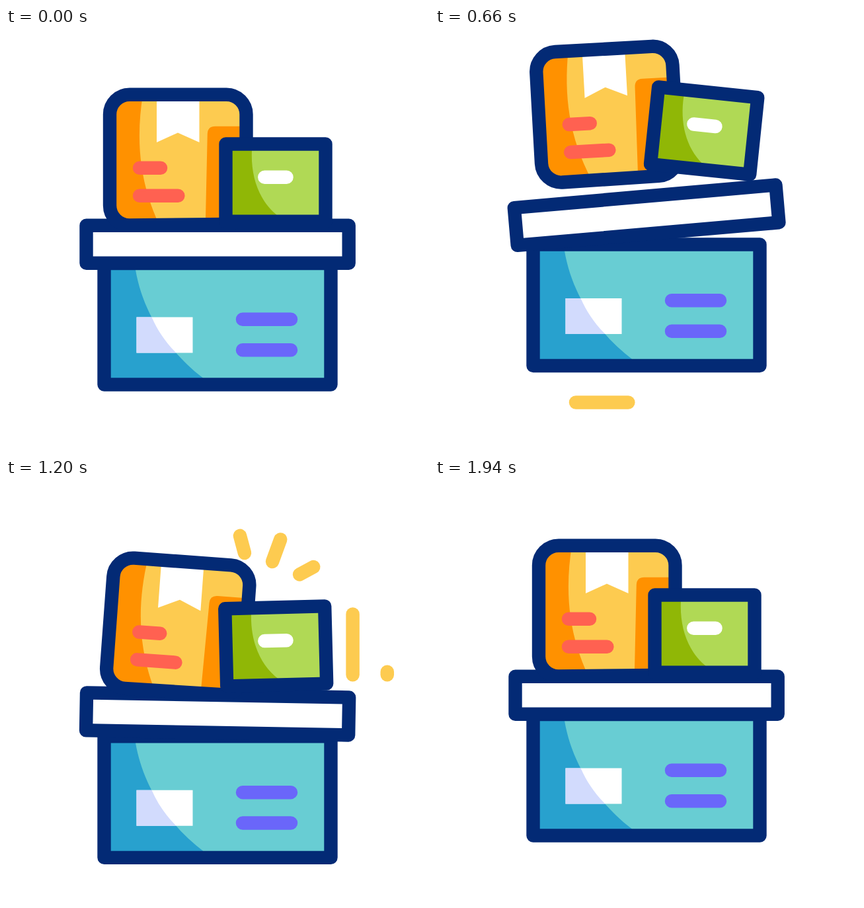
An HTML page without scripts that plays this animation: 640 px wide and 640 px high, repeating every 2660 ms.

```html
<!DOCTYPE html>
<html lang="en">
<head>
<meta charset="utf-8">
<title>Bouncing boxes</title>
<style>
  html, body { margin: 0; width: 100%; height: 100%; overflow: hidden; background: #fff; }
  svg { display: block; width: 100vw; height: 100vh; }
  g, .dash {
    animation: 2660ms cubic-bezier(.333, 0, .667, 1) infinite;
  }
  .edge { fill: none; stroke: #032a75; stroke-width: 20.4; stroke-linejoin: round; }
  .pill { stroke-width: 20.5; stroke-linecap: round; }
  .dash {
    fill: none; stroke: #fdcb50; stroke-width: 20.5; stroke-linecap: round;
    stroke-dasharray: 100 200; stroke-dashoffset: 101;
  }

  /* stack */
  #base { animation-name: base-y; }
  #lid { animation-name: lid-y, lid-r; transform-origin: 320px 327px; }
  #parcel { animation-name: parcel-y, parcel-r; transform-origin: 260.5px 199.5px; }
  #crate { animation-name: crate-y, crate-r; transform-origin: 408px 226px; }

  @keyframes base-y {
    0%, 7.03% { translate: 0 0; }
    23% { translate: 0 -29.7px; }
    45.6% { translate: 0 33.4px; }
    66.92%, 100% { translate: 0 0; }
  }
  @keyframes lid-y {
    0%, 7.03% { translate: 0 0; }
    23.31% { translate: 0 -45px; }
    45.6% { translate: 0 28.3px; }
    66.92%, 100% { translate: 0 0; }
  }
  @keyframes lid-r {
    0%, 7.03% { rotate: 0deg; }
    23.8% { rotate: -5.03deg; }
    45.6% { rotate: 1.03deg; }
    60.15%, 100% { rotate: 0deg; }
  }
  @keyframes parcel-y {
    0%, 7.03% { translate: 0 0; }
    23.31% { translate: 0 -70.2px; }
    45.6% { translate: 0 24.2px; }
    66.92%, 100% { translate: 0 0; }
  }
  @keyframes parcel-r {
    0%, 9.77% { rotate: 0deg; }
    25.56% { rotate: -3.22deg; }
    48.5% { rotate: 4.65deg; animation-timing-function: cubic-bezier(.333, 0, .35, 1); }
    72.93%, 100% { rotate: 0deg; }
  }
  @keyframes crate-y {
    0%, 7.03% { translate: 0 0; }
    23.95% { translate: 0 -79px; }
    46.24% { translate: 0 19.5px; }
    64.3%, 100% { translate: 0 0; }
  }
  @keyframes crate-r {
    0%, 7.52% { rotate: 0deg; }
    26.3% { rotate: 6.05deg; }
    48.5% { rotate: -1.95deg; animation-timing-function: cubic-bezier(.333, 0, .5, 1); }
    72.93%, 100% { rotate: 0deg; }
  }

  /* speed lines: draw on, then wipe off from the tail */
  .low { animation-name: low; }
  .mid { animation-name: mid; }
  .far { animation-name: far; }
  .near { animation-name: near; }
  .spark { animation-name: spark; }

  @keyframes low {
    0%, 6.77% { stroke-dashoffset: 101; }
    15.04%, 16.95% { stroke-dashoffset: 0; }
    25.2%, 100% { stroke-dashoffset: -101; }
  }
  @keyframes mid {
    0%, 12.03% { stroke-dashoffset: 101; }
    20.2% { stroke-dashoffset: 0; }
    28.35%, 100% { stroke-dashoffset: -101; }
  }
  @keyframes far {
    0%, 28.05% { stroke-dashoffset: 101; }
    36.3% { stroke-dashoffset: 0; }
    47%, 100% { stroke-dashoffset: -101; }
  }
  @keyframes near {
    0%, 33.8% { stroke-dashoffset: 101; }
    43.2%, 44.9% { stroke-dashoffset: 0; }
    54.1%, 100% { stroke-dashoffset: -101; }
  }
  @keyframes spark {
    0%, 39.1% { stroke-dashoffset: 101; }
    47.4% { stroke-dashoffset: 0; }
    55.6%, 100% { stroke-dashoffset: -101; }
  }
</style>
</head>
<body>
<svg viewBox="0 0 640 640">
  <path class="dash low" pathLength="100" d="M497.3 618.5H318"/>
  <path class="dash mid" pathLength="100" d="M417 566.5H213"/>
  <path class="dash far" pathLength="100" d="M576.8 232.3V296.3"/>
  <path class="dash near" pathLength="100" d="M524.6 204.3V296.3"/>
  <path class="dash spark" pathLength="100" d="M361 112L352.4 80"/>
  <path class="dash spark" pathLength="100" d="M403 125L418 84"/>
  <path class="dash spark" pathLength="100" d="M444 144.5L470 130.5"/>

  <g id="base">
    <path fill="#68cdd3" d="M148.5 356H491.5V539.5H148.5z"/>
    <path fill="#28a1ce" d="M148.5 356H194L196 366C207 430 245 490 300 531V539.5H148.5z"/>
    <path fill="#fff" d="M197.5 437.5H282.5V491.5H197.5z"/>
    <path fill="#d2dbfd" d="M197.5 437.5H220.5C229 457 241 475 257.5 491.5H197.5z"/>
    <path class="pill" stroke="#6a66fa" d="M358 440.8H431M358 487.2H431"/>
    <path class="edge" d="M148.5 356H491.5V539.5H148.5z"/>
  </g>

  <g id="lid">
    <path class="edge" style="fill:#fff" d="M121.5 298.7H518.7V355.7H121.5z"/>
  </g>

  <g id="parcel">
    <path fill="#fdcb50" d="M187 100.7H333.5a30 30 0 0 1 30 30V267a30 30 0 0 1-30 30L187 298.5a30 30 0 0 1-30-30V130.7a30 30 0 0 1 30-30z"/>
    <path fill="#ff9100" d="M187 100.7H207C197 165 200 230 232 298L187 298.5a30 30 0 0 1-30-30V130.7a30 30 0 0 1 30-30z"/>
    <path fill="#ff9100" d="M363 148.8H316.5Q305.3 148.8 304.8 160L301.8 297H333.5a30 30 0 0 0 29.5-30z"/>
    <path fill="#fff" d="M228 105H292.5V173L260 158.5L228 173z"/>
    <path class="pill" stroke="#ff6151" d="M202 211.7H234M202 253.7H260.3"/>
    <path class="edge" d="M187 100.7H333.5a30 30 0 0 1 30 30V267a30 30 0 0 1-30 30L187 298.5a30 30 0 0 1-30-30V130.7a30 30 0 0 1 30-30z"/>
  </g>

  <g id="crate">
    <path fill="#b0d955" d="M332.5 175.5H483.5V292.7H332.5z"/>
    <path fill="#90b706" d="M332.5 175.5H372.5L372 185C370 225 383 262 411 284V292.7H332.5z"/>
    <path class="pill" stroke="#fff" d="M391.3 225.8H424.5"/>
    <path class="edge" d="M332.5 175.5H483.5V292.7H332.5z"/>
  </g>
</svg>
</body>
</html>
```
